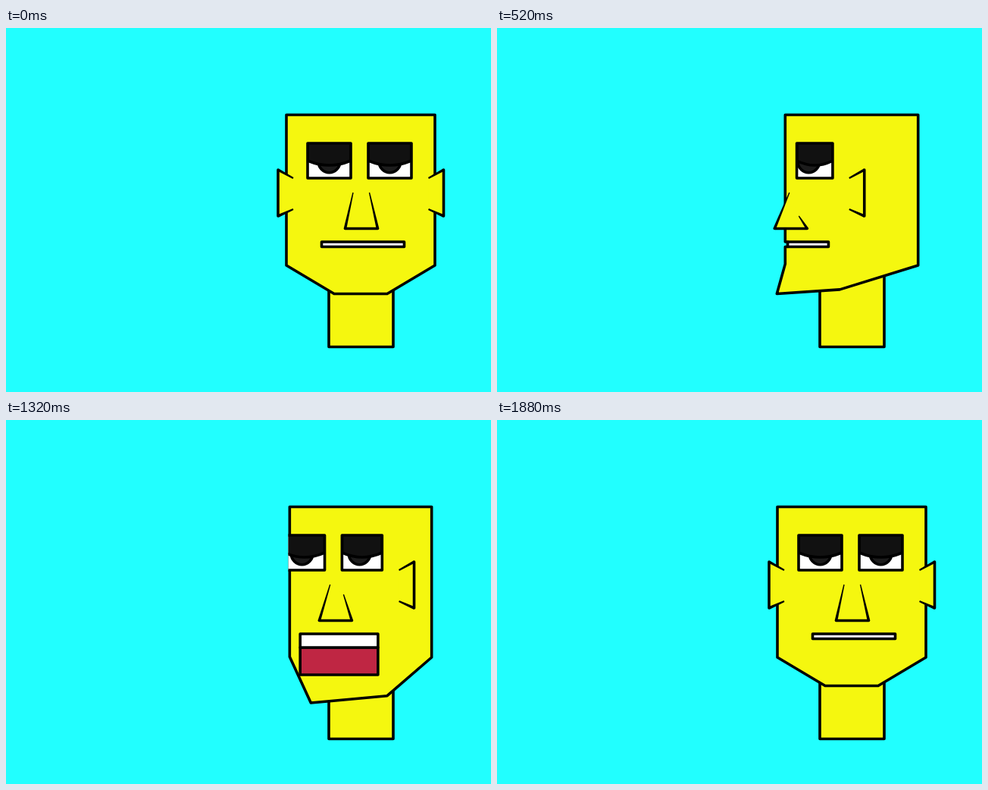
Recreate the animation shown at these times as an HTML page with a canvas. Size 640x480 px, loop 1920 ms.

```html
<!DOCTYPE html>
<html lang="en">
<head>
<meta charset="utf-8">
<title>Talking head</title>
<style>
html, body { margin: 0; height: 100%; overflow: hidden; background: #21ffff; }
canvas { display: block; width: 100vw; height: 100vh; }
</style>
</head>
<body>
<canvas id="stage" width="640" height="480"></canvas>
<script>
const c = document.getElementById('stage').getContext('2d');
const SKIN = '#f5f70f', LINE = 3.6;

function shape(points, fill, stroke = true) {
  c.beginPath();
  points.forEach(([x, y]) => c.lineTo(x, y));
  c.closePath();
  c.fillStyle = fill;
  c.fill();
  if (stroke) c.stroke();
}

function box(x1, y1, x2, y2, fill, stroke) {
  shape([[x1, y1], [x2, y1], [x2, y2], [x1, y2]], fill, stroke);
}

// Line that widens from a thin tip to full weight
function taper([x1, y1], [x2, y2], tip) {
  const len = Math.hypot(x2 - x1, y2 - y1);
  const nx = (y1 - y2) / len / 2, ny = (x2 - x1) / len / 2;
  shape([[x1 + nx * tip, y1 + ny * tip], [x2 + nx * LINE, y2 + ny * LINE],
    [x2 - nx * LINE, y2 - ny * LINE], [x1 - nx * tip, y1 - ny * tip]], '#000', false);
}

// Four points: open ends first and last, full-weight line in the middle
function flap(a, b, d, e, tip) {
  shape([a, b, d, e], SKIN, false);
  c.beginPath();
  c.moveTo(...b);
  c.lineTo(...d);
  c.stroke();
  taper(a, b, tip);
  taper(e, d, tip);
}

function ear(x, side) {
  const tip = x - 20 * side;
  flap([tip, 198], [x, 187], [x, 248], [tip, 239], 2);
}

function eye(x1, x2, look) {
  const mid = (x1 + x2) / 2;
  box(x1, 152, x2, 198, '#fff', false);
  c.save();
  c.beginPath();
  c.rect(x1, 152, x2 - x1, 46);
  c.clip();
  c.beginPath();
  c.arc(mid + look, 176.5, 14.2, 0, 2 * Math.PI);
  c.fillStyle = '#1c1c1c';
  c.fill();
  c.stroke();
  c.beginPath();
  c.moveTo(x1, 152);
  c.lineTo(x1, 175);
  c.quadraticCurveTo(mid, 187, x2, 175);
  c.lineTo(x2, 152);
  c.fillStyle = '#111';
  c.fill();
  c.stroke();
  c.restore();
  c.beginPath();
  c.rect(x1, 152, x2 - x1, 46);
  c.stroke();
}

// p: 0 = facing front, 1 = profile
function draw(p, open) {
  c.fillStyle = '#21ffff';
  c.fillRect(0, 0, 640, 480);
  c.strokeStyle = '#000';
  c.lineWidth = LINE;
  c.lineJoin = c.lineCap = 'round';

  const left = 370 + 11 * p, right = 566 - 11 * p;
  const chinL = open ? [433 - 78 * p, 373] : [433 - 68 * p, 350.5];
  const chinR = open ? [503, 373 - 23.6 * p] : [503 - 54 * p, 350.5 - 6 * p];
  const lipL = Math.max(416.5 - (open ? 72 : 88) * p, left + 3.3);
  const lipR = 525.5 - (open ? 88 : 94) * p;
  const gap = lipL + 37 * Math.min(1, Math.max(0, (p - .5) / .328));
  const corner = [left, 313 - 2 * p];

  box(426, 320, 511, 420.5, SKIN);
  if (p > 0) ear(359 + 90 * p, -1);

  const head = [[left, 114.5], [right, 114.5], [right, 313], chinR, chinL];
  if (p < .52) head.push(corner);
  else if (open) {
    const jaw = left + (chinL[0] - left) * 23 / 60;
    head.push([jaw, 336], [gap, 336], [gap, 300], [lipL, 300], [lipL, 282], [left, 282]);
  } else {
    head.push(corner, [left, 288.5], [lipL, 288.5], [lipL, 282], [left, 282]);
  }
  shape(head, SKIN);
  if (p === 0) ear(359, -1);
  ear(577.5 - 99 * p, 1);

  c.save();
  c.beginPath();
  c.rect(left - 1.8, 100, 220, 120);
  c.clip();
  eye(398 - 78 * p, 455 - 87.6 * p, -8.5 * p);
  eye(478 - 88 * p, 535 - 98.3 * p, -8.5 * p);
  c.restore();

  if (open) box(gap, 300, lipR, 336, '#bf2643');
  box(lipL, 282, lipR, open ? 300 : 288.5, open ? '#fff' : '#f6f2fc');

  const nose = 447.5 - 86.7 * p;
  flap([458 - 77 * p, 217], [nose, 264.5], [nose + 43, 264.5], [nose + 32, 217 + 33 * p], 1.3);
}

function ease(x) {
  x = Math.min(1, Math.max(0, x));
  return x * x * (3 - 2 * x);
}

const start = performance.now();

function tick() {
  const t = Math.max(0, performance.now() - start) % 1920;
  const step = Math.floor(t / 40);
  const turn = ease((step - 2.33) / 12.6) - ease((step - 25.57) / 13);
  draw(turn, (step + 7) % 12 < 6);
  requestAnimationFrame(tick);
}
tick();
</script>
</body>
</html>
```
